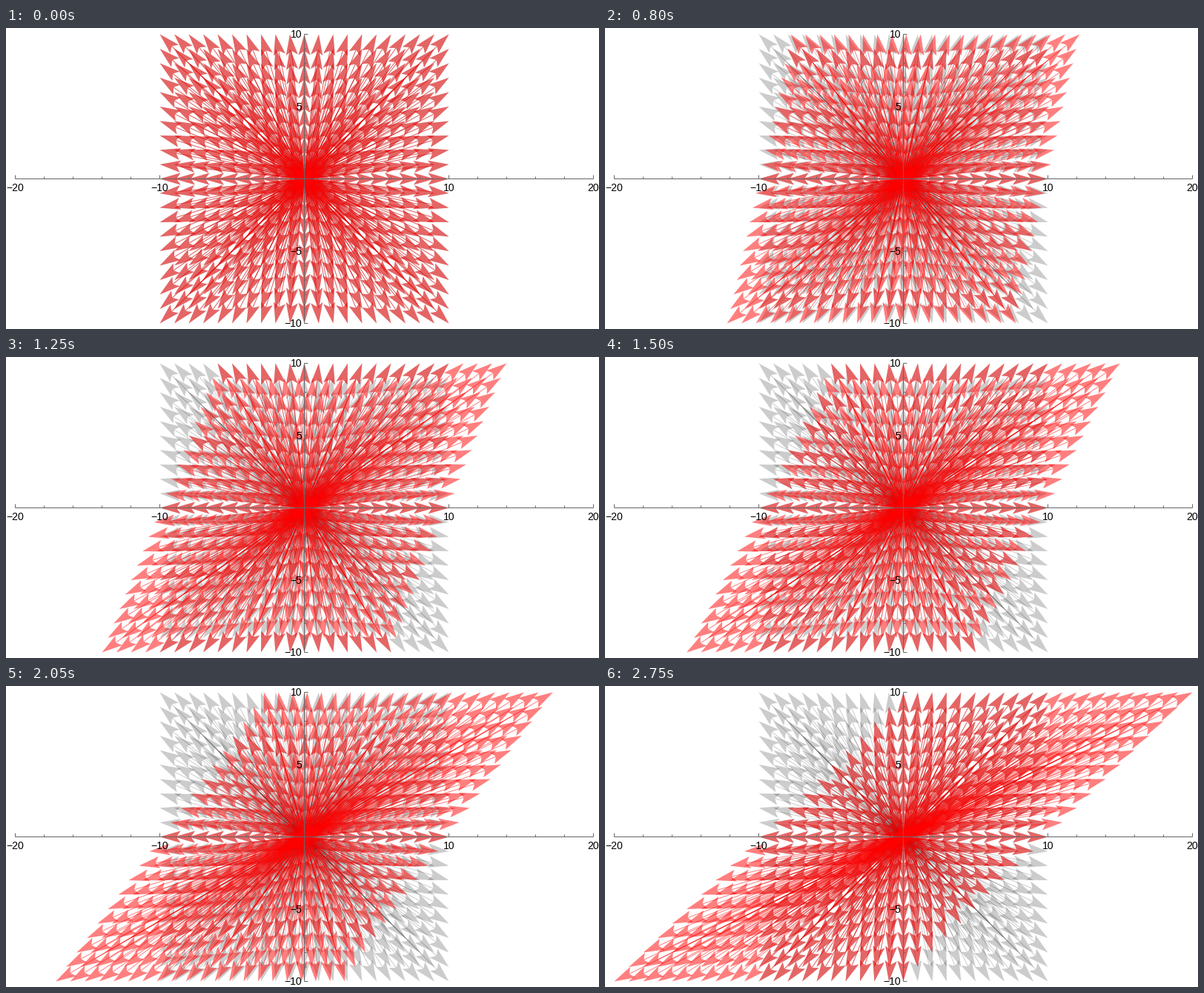
Animation, 800 px wide and 406 px high, one loop 3250 ms. Source, as a matplotlib script:

```python
import numpy as np
import matplotlib.pyplot as plt
from matplotlib.animation import FuncAnimation
from matplotlib.collections import LineCollection, PolyCollection

W, H, DPI = 800, 406, 64      # a power of two keeps the pixel size exact
PX = 72 / DPI                 # points per pixel
UNIT = 19.5                   # pixels per data unit
ORIGIN = np.array([402.5, 203.5])
HEAD, HALF, NOTCH = 28, 8, 22.5
FRAMES, HOLD, STEPS = 65, 5, 50
AXIS = "0.4"

fig = plt.figure(figsize=(W / DPI, H / DPI), dpi=DPI, facecolor="white")
ax = fig.add_axes([0, 0, 1, 1])
ax.set_xlim(0, W)
ax.set_ylim(H, 0)
ax.axis("off")

side = np.arange(-10, 11)
grid = np.array([(x, y) for x in side for y in side if x or y], float)


def to_px(points):
    return ORIGIN + points * [UNIT, -UNIT]


def arrow_shapes(vectors):
    """Shafts from the origin and notched heads ending at each vector."""
    tip = to_px(vectors)
    d = tip - ORIGIN
    length = np.hypot(d[:, 0], d[:, 1])[:, None]
    u = d / length
    n = u[:, ::-1] * [-1, 1]
    back = tip - HEAD * u
    notch = tip - NOTCH * u
    start = np.broadcast_to(ORIGIN, tip.shape)
    end = np.where(length > NOTCH, notch, start)
    shafts = np.stack([start, end], axis=1)
    heads = np.stack([tip, back + HALF * n, notch, back - HALF * n], axis=1)
    return shafts, heads


def add_arrows(vectors, color, alpha, z):
    shafts, heads = arrow_shapes(vectors)
    lines = LineCollection(shafts, colors=color, alpha=alpha, linewidths=PX,
                           capstyle="butt", snap=False, zorder=z)
    polys = PolyCollection(heads, facecolors=color, alpha=alpha,
                           edgecolors="none", linewidths=0, snap=False, zorder=z)
    ax.add_collection(lines, autolim=False)
    ax.add_collection(polys, autolim=False)
    return lines, polys


def segment(x0, y0, x1, y1):
    ax.plot([x0, x1], [y0, y1], color=AXIS, lw=PX, zorder=5,
            solid_capstyle="butt", snap=False)


def label(x, y, value, ha):
    ax.text(x, y, str(value).replace("-", "\u2212"), ha=ha, va="baseline",
            family="Liberation Sans", fontsize=14 * PX, color="black", zorder=6)


def draw_axes():
    ox, oy = ORIGIN
    segment(ox - 20 * UNIT, oy, ox + 20 * UNIT, oy)
    segment(ox, oy - 10 * UNIT, ox, oy + 10 * UNIT)
    for v in range(-20, 21, 2):
        x = ox + v * UNIT
        major = v % 10 == 0
        segment(x, oy, x, oy - (5 if major else 3))
        if major and v:
            label(x, oy + 16.8, v, "center")
    for v in range(-10, 11):
        y = oy - v * UNIT
        major = v % 5 == 0
        segment(ox, y, ox + (5 if major else 3), y)
        if major and v:
            label(ox - 3.5, y + 4.7, v, "right")


add_arrows(grid, "black", 0.2, 1)
red_shafts, red_heads = add_arrows(grid, "red", 0.5, 2)
draw_axes()


def update(i):
    shear = np.clip(i - HOLD, 0, STEPS) / STEPS
    shafts, heads = arrow_shapes(grid @ np.array([[1, 0], [shear, 1]]))
    red_shafts.set_segments(shafts)
    red_heads.set_verts(heads)
    return red_shafts, red_heads


anim = FuncAnimation(fig, update, frames=FRAMES, interval=50,
                     repeat=True, repeat_delay=0, blit=False)
plt.show()
```
